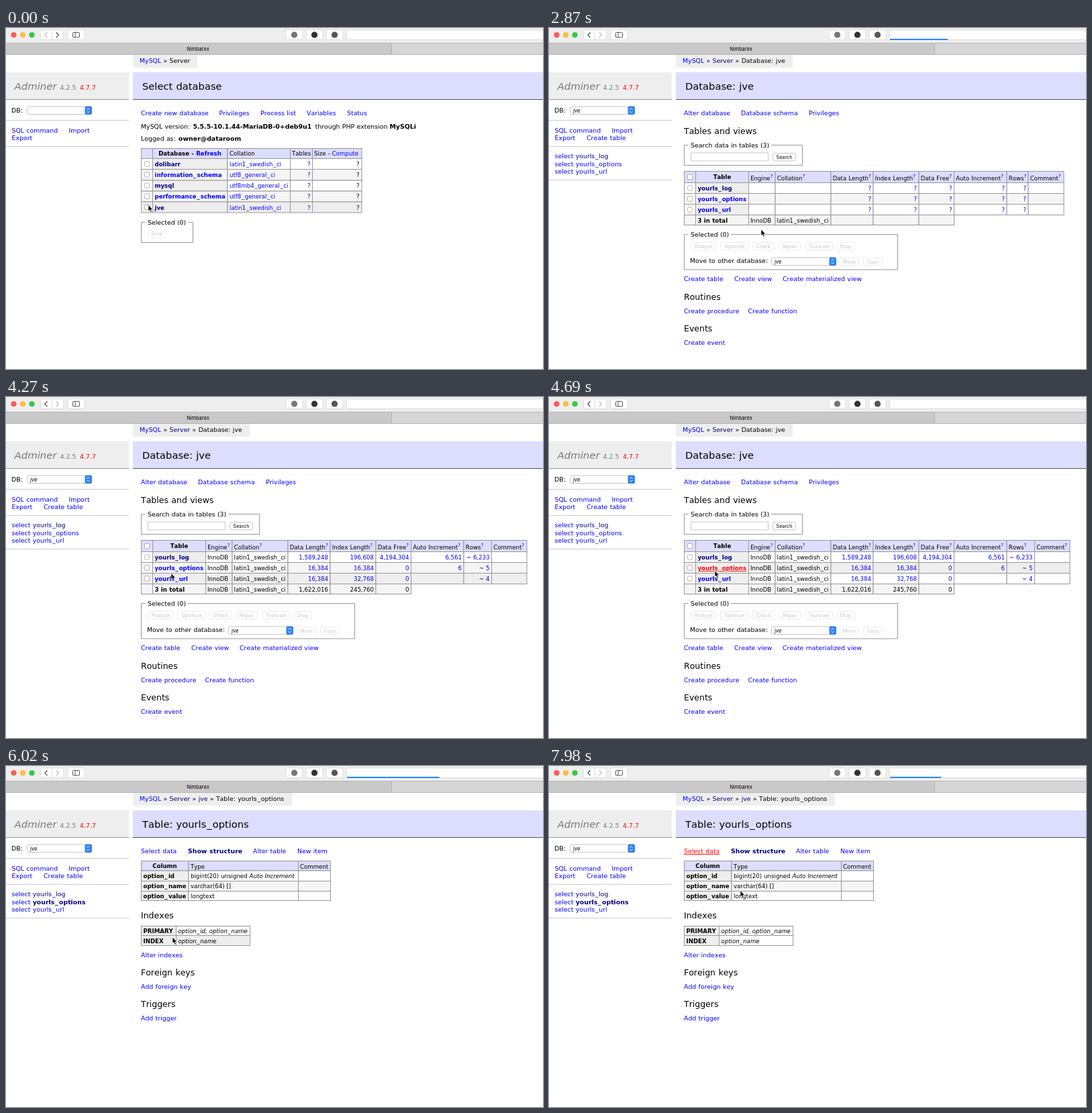
Animation of 800x508 px, one loop 8 s. Source, as an HTML page:

```html
<!DOCTYPE html>
<html lang="en">
<head>
<meta charset="utf-8">
<title>Database browser</title>
<style>
html, body { margin: 0; width: 100%; height: 100%; overflow: hidden; background: #fff; }
svg { display: block; width: 100%; height: 100%; }
text { font-family: "DejaVu Sans", sans-serif; font-kerning: none; word-spacing: .034em; white-space: pre; fill: #000; }
.ui { font-family: Inter, "Liberation Sans", sans-serif; }
.b { font-weight: bold; }
.i { font-style: italic; }
.l { fill: #00f; }
.v { fill: #000080; }
.r { fill: #f00; text-decoration: underline; }
.red { fill: #f00; }
.g { fill: #777; }
.off { fill: #c6c6c6; }
.e { text-anchor: end; }
.m { text-anchor: middle; }
.u { letter-spacing: .068em; }
.b .u, .b.u { letter-spacing: .14em; }
</style>
</head>
<body>
<svg viewBox="0 0 800 508" preserveAspectRatio="none">
  <g id="chrome"></g>
  <g id="page"></g>
  <rect id="bar" x="508" y="16" height="1.9" fill="#1a86fb"/>
  <path id="arrow" d="M0 0V9.4L2.1 7.5L3.6 11L5.3 10.3L3.8 6.9H6.7Z" fill="#000" stroke="#fff" stroke-width=".7"/>
  <path id="beam" d="M-1.8-4.4Q0-4.4 0-3.2Q0-4.4 1.8-4.4M0-3.2V3.2M-1.8 4.4Q0 4.4 0 3.2Q0 4.4 1.8 4.4M-1 1H1" fill="none" stroke="#222" stroke-width=".9"/>
</svg>
<script>
const LOOP = 8000, STEP = 70;
const BASE = 9.4, CELL = 8.6, HEAD = 8.65, H3 = 12.5, H2 = 14.7;
const DB = 'jve', HOST = 'owner@dataroom', TAB = 'Nimbarex';
const TABLES = ['yourls_log', 'yourls_options', 'yourls_url'];
const $ = id => document.getElementById(id);

// Page appears, link is clicked.
const VIEWS = [
  { from: 0, click: 490 },
  { from: 2800, click: 5250 },
  { from: 5880, click: 7630 }
];
const FILLED = 3080;
const LOADS = [
  { from: 490, done: 3150 },
  { from: 5250, done: 5950 },
  { from: 7700, done: Infinity }
];
// Pointer stops: time, x, y
const PATH = [
  [0, 212, 263.5], [140, 213, 264], [420, 228, 267], [560, 230, 268], [840, 268, 282],
  [1470, 315, 294], [1680, 316, 300], [3220, 316, 300], [4060, 246, 262.6],
  [4480, 246, 262.6], [4900, 248, 255], [6160, 248, 255], [6720, 235, 177],
  [7000, 235, 177], [7420, 229, 127], [7700, 230, 128], [7980, 285, 185.5]
];

const clamp = v => Math.max(0, Math.min(1, v));
const smooth = v => v * v * (3 - 2 * v);

function pointer(t) {
  const k = PATH.findIndex(p => p[0] > t);
  if (k < 0) return { x: PATH.at(-1)[1], y: PATH.at(-1)[2] };
  const [t0, x0, y0] = PATH[k - 1], [t1, x1, y1] = PATH[k];
  const f = smooth((t - t0) / (t1 - t0));
  return { x: x0 + (x1 - x0) * f, y: y0 + (y1 - y0) * f };
}

function progress(t) {
  const load = LOADS.findLast(l => t >= l.from);
  if (!load) return { w: 0, o: 0 };
  const d = t - load.from;
  const start = 76 * (1 - (1 - clamp(d / 140)) ** 1.5) + 10 * clamp((d - 280) / 70);
  const end = t - load.done;
  return { w: start + (292 - start) * clamp(end / 280), o: 1 - clamp((end - 280) / 140) };
}

// Drawing helpers return markup.
const glyphs = s => String(s).replace(/_/g, '<tspan class="u" dx=".07em">_</tspan>');
const text = (x, y, s, cls = '', size = BASE) =>
  `<text x="${x}" y="${y}" font-size="${size}" class="${cls}">${
    Array.isArray(s) ? s.map(([r, c]) => `<tspan class="${c || ''}">${glyphs(r)}</tspan>`).join('') : glyphs(s)
  }</text>`;
const rect = (x, y, w, h, fill, stroke = 'none', r = 0) =>
  `<rect x="${x}" y="${y}" width="${w}" height="${h}" fill="${fill}" stroke="${stroke}" rx="${r}"/>`;
const path = (d, stroke, width = 1) =>
  `<path d="${d}" fill="none" stroke="${stroke}" stroke-width="${width}"/>`;
const hline = (x, y, w, color) => path(`M${x} ${y}h${w}`, color);
const heading = (y, s) => text(201, y, s, '', H3);
const links = (y, ...items) => items.map(([x, s, cls = 'l']) => text(x, y, s, cls)).join('');
const check = (x, y) => rect(x - 3.6, y - 3.6, 7.2, 7.2, '#fff', '#b5b5b5', 1.6);

function button(x, y, w, label, cls = 'off') {
  return rect(x + .5, y + .5, w - 1, 11.5, '#fff', cls ? '#ebebeb' : '#c6c6c6', 2) +
    text(x + w / 2, y + 8.8, label, 'ui m ' + cls, 7.2);
}

function select(x, y, value) {
  const a = x + 91.5, c = y + 6.3;
  return rect(x + .5, y + .5, 96, 11.6, '#fff', '#c4c4c4', 2.5) +
    rect(x + 86.5, y, 10.5, 12.6, '#2f83f5', 'none', 2.5) +
    path(`M${a - 2} ${c - 1.3}l2-2l2 2M${a - 2} ${c + 1.3}l2 2l2-2`, '#fff', 1) +
    text(x + 5, y + 9, value, 'ui', 7.6);
}

function fieldset(x, y, w, h, legend, gap) {
  return path(`M${x + 6} ${y}H${x}v${h}h${w}v${-h}H${gap}`, '#999') + text(211, y + 3.5, legend);
}

function table(xs, ys, pos, { th = 0, head = true, striped = true, foot = xs.length - 1 } = {}) {
  let out = '';
  for (let j = 0; j < ys.length - 1; j++) {
    const body = head ? j - 1 : j;
    const last = j === ys.length - 2 ? foot : xs.length - 1;
    const over = pos.x >= xs[0] && pos.x < xs[last] && pos.y >= ys[j] && pos.y < ys[j + 1];
    for (let k = 0; k < last; k++) {
      const fill = body < 0 ? '#ddf' : over ? '#eee' : striped && body % 2 ? '#f5f5f5' : k === th ? '#eee' : '#fff';
      out += rect(xs[k], ys[j], xs[k + 1] - xs[k], ys[j + 1] - ys[j], fill, '#999');
    }
  }
  return out;
}

function drawChrome() {
  let s = rect(0, 0, 800, 22, '#eee') + rect(0, 22, 574, 17.5, '#c9c9c9') +
    rect(574, 22, 226, 17.5, '#d6d6d6') + hline(0, 22.5, 800, '#b8b8b8') +
    hline(0, 39.5, 800, '#b4b4b4') + path('M574.5 22v17', '#b4b4b4');
  ['#fc5b57', '#fdbc40', '#34c84a'].forEach((c, k) => {
    s += `<circle cx="${11.5 + k * 13.5}" cy="10.3" r="4.1" fill="${c}"/>`;
  });
  for (const [x, w] of [[51.5, 34], [92, 25], [417, 25], [447, 25], [477, 25]])
    s += rect(x, 3, w, 14.5, '#fff', '#dedede', 2.5);
  s += path('M68.5 3v14.5', '#e0e0e0') + rect(99.5, 6.5, 10, 7.5, 'none', '#555', 1) + path('M103 6.5v7.5', '#555');
  [['#777', 429.5], ['#333', 459.5], ['#555', 489.5]].forEach(([c, x]) => {
    s += `<circle cx="${x}" cy="10.2" r="4.6" fill="${c}"/>`;
  });
  s += rect(507.5, 3, 300, 14.5, '#fff', '#dedede', 2.5);
  $('chrome').innerHTML = s + text(286, 33.7, TAB, 'ui m', 7.4);
}

function frame(view, title, crumbs, crumbEnd) {
  const arrows = view ? ['#444', '#bbb'] : ['#bbb', '#444'];
  let s = path('M61.5 6.5l-3.6 3.8l3.6 3.8', arrows[0], 1.2) + path('M74.8 6.5l3.6 3.8l-3.6 3.8', arrows[1], 1.2) +
    rect(189, 40, crumbEnd - 189, 19, '#eee') + text(199, 52, crumbs) +
    rect(189, 66, 611, 41, '#ddf') + hline(189, 106.5, 611, '#555') + text(203, 92, title, '', H2) +
    rect(0, 66, 183, 41, '#eee') + hline(0, 106.5, 183, '#999') +
    text(12.5, 92, 'Adminer', 'i g', 14.9) + text(80.5, 92, '4.2.5', 'g') + text(110, 92, '4.7.7', 'red') +
    text(8, 125.5, 'DB:') + select(31, 116.5, view ? DB : '') +
    hline(0, 137.5, 183, '#ccc') + hline(0, 176.5, 183, '#ccc') +
    links(155.5, [8.5, 'SQL command'], [93.5, 'Import']) + links(167, [8.5, 'Export']);
  if (!view) return s;
  s += links(167, [56, 'Create table']) + hline(0, 226.5, 183, '#ccc');
  TABLES.forEach((name, k) => {
    const cls = view === 2 && k === 1 ? 'v b' : k === 0 ? 'v' : 'l';
    s += text(8.5, 194 + k * 11.6, [['select ', 'l'], [name, cls]]);
  });
  return s;
}

const within = (p, x0, y0, x1, y1) => p.x >= x0 && p.x <= x1 && p.y >= y0 && p.y <= y1;

function serverPage(pos) {
  const ys = [179.5, 194.5, 210.5, 227, 243, 259, 275];
  let s = frame(0, 'Select database', [['MySQL', 'l'], [' » Server']], 285) +
    links(130, [201, 'Create new database'], [317.5, 'Privileges'], [379, 'Process list'], [448, 'Variables'], [508, 'Status']) +
    text(201, 149.5, 'MySQL version:') + text(278.5, 149.5, '5.5.5-10.1.44-MariaDB-0+deb9u1', 'b') +
    text(460.5, 149.5, 'through PHP extension') + text(571.5, 149.5, 'MySQLi', 'b') +
    text(201, 168, 'Logged as:') + text(257, 168, HOST, 'b') +
    table([201.5, 218.5, 330, 423.5, 456.5, 530], ys, pos, { th: 1 }) +
    text(274, 190, [['Database - '], ['Refresh', 'l']], 'b m', HEAD) +
    text(333, 190.3, 'Collation', '', CELL) + text(426, 190.3, 'Tables', '', CELL) +
    text(459, 190.3, [['Size - '], ['Compute', 'l']], '', CELL);
  const rows = [
    ['dolibarr', 'latin1_swedish_ci'], ['information_schema', 'utf8_general_ci'], ['mysql', 'utf8mb4_general_ci'],
    ['performance_schema', 'utf8_general_ci'], [DB, 'latin1_swedish_ci']
  ];
  rows.forEach(([name, coll], k) => {
    const y = +(206 + k * 16.15).toFixed(1);
    const hot = within(pos, 221, y - 9, k % 2 ? 325 : 250, y + 2);
    s += check(210, y - 3.7) + text(221.5, y, name, 'b ' + (hot ? 'r' : k % 2 ? 'l' : 'v'), HEAD) +
      text(333, y, coll, 'l', CELL) + text(453.5, y, '?', 'l e', CELL) + text(526.5, y, '?', 'e', CELL);
  });
  return s + fieldset(201.5, 289.5, 77, 30, 'Selected (0)', 271) + button(211, 300.5, 28, 'Drop');
}

function databasePage(pos, filled) {
  const end = filled ? [723.5, 776] : [714, 767];
  const xs = [201.5, 218.5, 297.5, 337, 420, 483, 551, 603.5, 682, ...end];
  const right = k => xs[k + 1] - 3;
  let s = frame(1, 'Database: ' + DB, [['MySQL', 'l'], [' » '], ['Server', 'v'], [' » Database: ' + DB]], 363) +
    links(130, [201, 'Alter database'], [286, 'Database schema'], [387, 'Privileges']) +
    heading(157.5, 'Tables and views') +
    fieldset(201.5, 174.5, 176, 30, 'Search data in tables (3)', 331) +
    rect(211.5, 186, 115, 12, '#fff', '#c8c8c8') + button(333, 186, 35, 'Search', '') +
    table(xs, [213.5, 230.5, 246.5, 262.5, 278.5, 293.5], pos, { th: 1, foot: 7 }) +
    check(210, 222) + text(258, 225, 'Table', 'b m', HEAD);
  ['Engine', 'Collation', 'Data Length', 'Index Length', 'Data Free', 'Auto Increment', 'Rows', 'Comment'].forEach((h, k) => {
    s += text(xs[k + 2] + 2.7, 226.8, h + '<tspan class="l" dy="-3.4" font-size="7">?</tspan>', '', CELL);
  });
  const data = [
    ['1,589,248', '196,608', '4,194,304', '6,561', '~ 6,233'],
    ['16,384', '16,384', '0', '6', '~ 5'],
    ['16,384', '32,768', '0', '', '~ 4']
  ];
  const kind = y => text(300, y, 'InnoDB', '', CELL) + text(339.5, y, 'latin1_swedish_ci', '', CELL);
  TABLES.forEach((name, k) => {
    const y = 242 + k * 16;
    const hot = within(pos, 221, y - 8.5, k === 1 ? 294 : 271, y + 2);
    s += check(210, y - 3.5) + text(221.5, y, name, 'b ' + (hot ? 'r' : k ? 'l' : 'v'), HEAD);
    if (filled) s += kind(y);
    data[k].forEach((v, c) => { s += text(right(c + 4), y, filled ? v : '?', 'l e', CELL); });
  });
  s += text(221.5, 290, '3 in total', 'b', HEAD) + kind(290);
  if (filled) ['1,622,016', '245,760', '0'].forEach((v, c) => { s += text(right(c + 4), 290, v, 'e', CELL); });

  s += fieldset(201.5, 307.5, 318, 52.5, 'Selected (0)', 271);
  [[211, 38, 'Analyze'], [255, 43, 'Optimize'], [303, 33, 'Check'], [342, 33, 'Repair'], [382, 41, 'Truncate'], [428, 28, 'Drop']]
    .forEach(([x, w, label]) => { s += button(x, 318.8, w, label); });
  return s + text(210, 350.3, 'Move to other database:') + select(331, 341.5, DB) +
    button(433, 341.8, 29, 'Move') + button(468, 341.8, 29, 'Copy') +
    links(377, [201, 'Create table'], [276, 'Create view'], [348, 'Create materialized view']) +
    heading(404.5, 'Routines') + links(424.5, [201, 'Create procedure'], [296.5, 'Create function']) +
    heading(451.5, 'Events') + links(471.5, [201, 'Create event']);
}

function structurePage(pos) {
  const hot = within(pos, 201, 121, 254, 133);
  let s = frame(2, 'Table: yourls_options',
      [['MySQL', 'l'], [' » '], ['Server', 'v'], [' » '], [DB, 'v'], [' » Table: yourls_options']], 426) +
    links(130, [201, 'Select data', hot ? 'r' : 'l'], [271, 'Show structure', 'v b'], [368, 'Alter table'], [434, 'New item']) +
    table([201.5, 272, 435.5, 483.5], [141.5, 156, 171.5, 186.5, 200.5], pos) +
    text(236.5, 152.3, 'Column', 'b m', HEAD) + text(275, 152.5, 'Type', '', CELL) + text(438, 152.5, 'Comment', '', CELL);
  [
    ['option_id', [['bigint(20) unsigned '], ['Auto Increment', 'i']]],
    ['option_name', 'varchar(64) []'],
    ['option_value', 'longtext']
  ].forEach(([name, type], k) => {
    const y = 167 + k * 15;
    s += text(204.5, y, name, 'b', HEAD) + text(275, y, type, '', CELL);
  });
  s += heading(226.5, 'Indexes') +
    table([201.5, 253.5, 363.5], [238.5, 252.5, 267.5], pos, { head: false, striped: false });
  [['PRIMARY', 'option_id, option_name'], ['INDEX', 'option_name']].forEach(([name, cols], k) => {
    const y = 249.2 + k * 14.8;
    s += text(204.5, y, name, 'b', HEAD) + text(256.5, y, cols, 'i', CELL);
  });
  return s + links(284.5, [201, 'Alter indexes']) +
    heading(312, 'Foreign keys') + links(332, [201, 'Add foreign key']) +
    heading(359, 'Triggers') + links(379, [201, 'Add trigger']);
}

const PAGES = [serverPage, databasePage, structurePage];
let shown = '';

function render(t) {
  const view = VIEWS.findLastIndex(v => t >= v.from);
  // After a click the page keeps its hover state until the next one arrives.
  const held = pointer(Math.min(t, VIEWS[view].click));
  const markup = PAGES[view](held, t >= FILLED);
  if (markup !== shown) $('page').innerHTML = shown = markup;

  const { w, o } = progress(t);
  $('bar').setAttribute('width', w);
  $('bar').setAttribute('opacity', o);

  const p = pointer(t), beam = view === 2 && within(held, 204, 174, 270, 184);
  for (const [id, on] of [['arrow', !beam], ['beam', beam]]) {
    $(id).setAttribute('transform', `translate(${p.x} ${p.y})`);
    $(id).setAttribute('visibility', on ? 'visible' : 'hidden');
  }
}

drawChrome();
const begun = performance.now();
let last = -1;
function tick() {
  const t = Math.floor(((performance.now() - begun) % LOOP) / STEP) * STEP;
  if (t !== last) render(last = t);
  requestAnimationFrame(tick);
}
tick();
</script>
</body>
</html>
```
